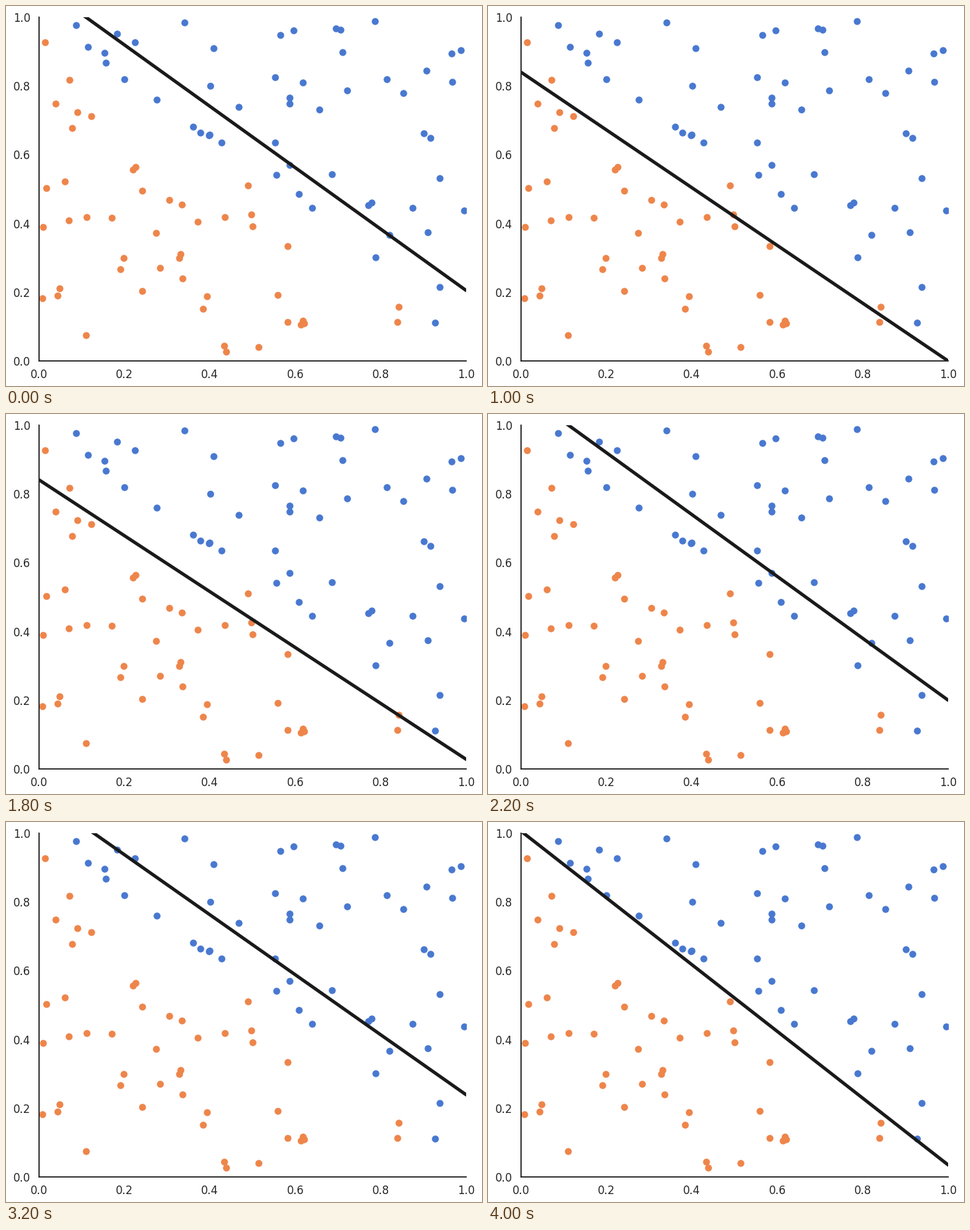
A matplotlib script for the animation above (8000 ms loop, 720 px wide and 576 px high).

```python
import numpy as np
import matplotlib.pyplot as plt
from matplotlib.animation import FuncAnimation

W, H, DPI = 720, 576, 72
LEFT, RIGHT, TOP, BOTTOM = 50, 696, 17, 538  # axes edges in pixels from the top left
STEP_MS, LOOP_MS = 200, 8000
INK = "#262626"

upper = np.array([
    (.086, .977), (.115, .914), (.154, .896), (.156, .867), (.183, .952),
    (.224, .927), (.199, .819), (.341, .984), (.409, .909), (.401, .800),
    (.276, .760), (.468, .739), (.360, .681), (.378, .664), (.398, .656),
    (.400, .658), (.428, .635), (.565, .948), (.596, .961), (.553, .825),
    (.617, .810), (.587, .766), (.587, .748), (.657, .731), (.553, .635),
    (.556, .541), (.587, .570), (.609, .485), (.640, .445), (.685, .543),
    (.695, .967), (.706, .963), (.711, .898), (.722, .787), (.787, .988),
    (.815, .819), (.853, .779), (.907, .844), (.966, .894), (.988, .904),
    (.968, .812), (.901, .662), (.917, .648), (.938, .531), (.996, .437),
    (.875, .445), (.910, .374), (.771, .453), (.779, .460), (.821, .366),
    (.788, .301), (.938, .215), (.928, .111),
])

lower = np.array([
    (.014, .927), (.071, .817), (.039, .748), (.090, .723), (.123, .712),
    (.078, .677), (.220, .556), (.226, .564), (.061, .522), (.017, .503),
    (.242, .495), (.305, .468), (.335, .455), (.489, .510), (.497, .426),
    (.500, .391), (.435, .418), (.372, .405), (.070, .409), (.112, .418),
    (.171, .416), (.009, .389), (.274, .372), (.332, .311), (.328, .299),
    (.198, .299), (.191, .267), (.284, .270), (.336, .240), (.242, .203),
    (.048, .211), (.043, .190), (.007, .182), (.393, .188), (.384, .151),
    (.110, .075), (.434, .044), (.438, .027), (.514, .040), (.559, .192),
    (.582, .334), (.582, .113), (.613, .105), (.618, .117), (.621, .109),
    (.842, .157), (.839, .113),
])

# Height of the boundary at x = 0 and x = 1 after each training step
boundary = [
    (1.098, .205), (.980, .054), (1.110, .130), (1.067, .018),
    (.885, .015), (.840, .000), (1.030, .086), (.996, .099),
    (.904, .042), (.841, .028), (1.046, .155), (1.100, .200),
    (1.041, .067), (.965, .046), (.946, .023), (.900, .013),
    (1.112, .239), (1.130, .142), (1.049, .133), (1.030, .080),
    (1.006, .035),
]

plt.rcParams["font.family"] = "DejaVu Sans"
fig = plt.figure(figsize=(W / DPI, H / DPI), dpi=DPI, facecolor="white")
ax = fig.add_axes([LEFT / W, 1 - BOTTOM / H,
                   (RIGHT - LEFT) / W, (BOTTOM - TOP) / H])
ax.set(xlim=(0, 1), ylim=(0, 1))
ticks = np.linspace(0, 1, 6)
ax.set_xticks(ticks)
ax.set_yticks(ticks)
ax.tick_params(length=0, pad=12.5, labelsize=16.5, labelcolor=INK)
for side, spine in ax.spines.items():
    spine.set(visible=side in ("left", "bottom"), linewidth=1.875, edgecolor=INK)

for points, color in ((upper, "#4878d0"), (lower, "#ee854a")):
    ax.scatter(*points.T, s=81, color=color, linewidths=1.5)
line, = ax.plot([0, 1], boundary[0], color="#1a1a1a", lw=5,
                solid_capstyle="round")


def draw(i):
    line.set_ydata(boundary[min(i, len(boundary) - 1)])
    return line,


anim = FuncAnimation(fig, draw, frames=LOOP_MS // STEP_MS,
                     interval=STEP_MS, repeat=True)
plt.show()
```
